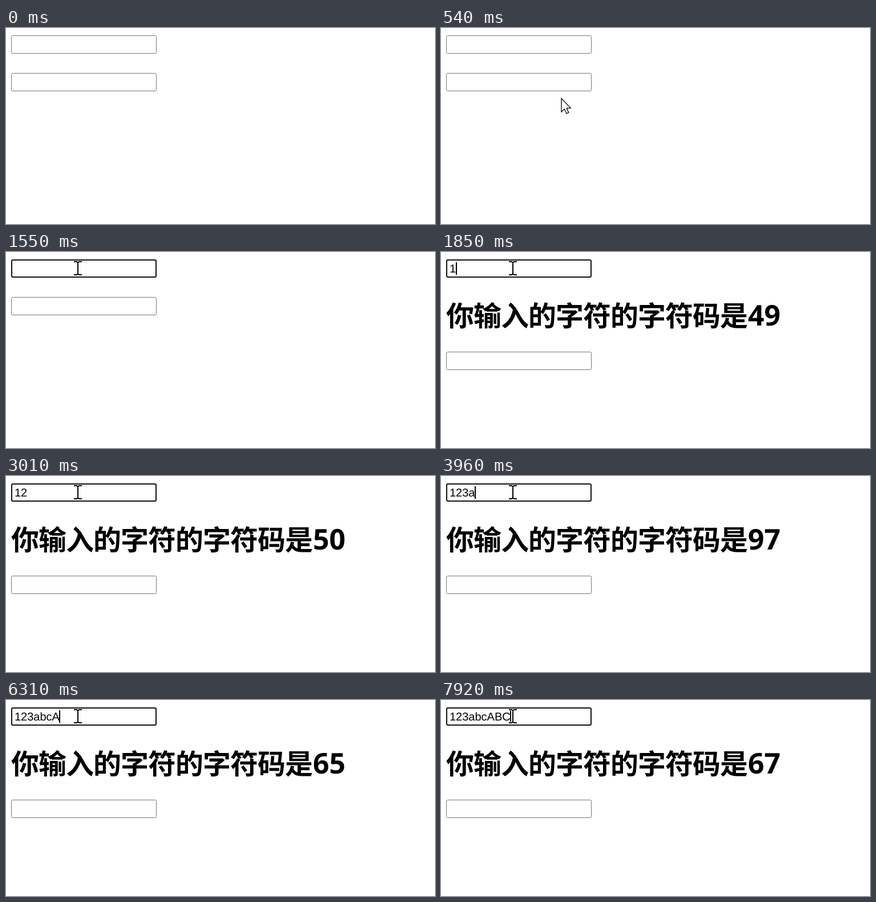
Recreate the animation shown at these times as an HTML page. Size 752x344 px, loop 8000 ms.

```html
<!DOCTYPE html>
<html lang="zh-CN">
<head>
<meta charset="utf-8">
<title>Key codes</title>
<style>
html, body { margin: 0; width: 100%; height: 100%; overflow: hidden; background: #fff; }
svg { display: block; }
text { white-space: pre; text-rendering: geometricPrecision; }
.field { fill: #fff; stroke: #767676; }
.field.hover { stroke: #4a4a4a; }
.field.focus { stroke: #101010; stroke-width: 2; }
#typed { font: 20px "Liberation Sans", Arial, sans-serif; }
#label { font: 700 49px "Noto Sans CJK SC", "Noto Sans CJK", "Noto Sans CJK JP", sans-serif; letter-spacing: -1px; }
#code { font: 700 50px "Open Sans", "Noto Sans", sans-serif; }
#beam path { fill: none; stroke: #000; stroke-width: 2; }
#beam path:first-child { stroke: #fff; stroke-width: 4; }
#arrow { fill: #fff; stroke: #000; stroke-width: 1.3; }
</style>
</head>
<body>
<svg width="752" height="344" viewBox="0 0 752 344">
  <defs>
    <path id="bar" d="M-7 -11.5H-2L0 -10L2 -11.5H7M0 -10.5V10.5M-7 11.5H-2L0 10L2 11.5H7"/>
  </defs>
  <rect id="first" class="field"/>
  <rect id="second" class="field" x="9.5" y="79.5" width="254" height="31" rx="2"/>
  <text id="typed" x="15" y="36"></text>
  <rect id="caret" y="18" width="2" height="22"/>
  <g id="result">
    <text id="label" x="9" y="129.5">你输入的字符的字符码是</text>
    <text id="code" x="538" y="128.5"></text>
  </g>
  <g id="pointer">
    <g id="beam">
      <path d="M-7 -11.5H-2L0 -10L2 -11.5H7M0 -10.5V10.5M-7 11.5H-2L0 10L2 11.5H7"/>
      <path d="M-7 -11.5H-2L0 -10L2 -11.5H7M0 -10.5V10.5M-7 11.5H-2L0 10L2 11.5H7"/>
    </g>
    <path id="arrow" d="M.7 1V24.5L6 19.4L9.6 27.5L13.4 25.8L9.9 17.9H17Z"/>
  </g>
</svg>
<script>
const LOOP = 8000, FOCUS = 1040, TICK = 50;

// time, typed text, caret shown
const steps = [
  [0, '', 0], [FOCUS, '', 1], [1550, '', 0],
  [1850, '1', 1], [2410, '1', 0],
  [2510, '12', 1], [3010, '12', 0],
  [3060, '123', 1], [3550, '123', 0],
  [3960, '123a', 1], [4510, '123a', 0],
  [4670, '123ab', 1],
  [5170, '123abc', 1], [5710, '123abc', 0], [6210, '123abc', 1],
  [6310, '123abcA', 1], [6820, '123abcA', 0], [7310, '123abcA', 1],
  [7360, '123abcAB', 1], [7870, '123abcAB', 0],
  [7920, '123abcABC', 1]
];

// time, x, y of the pointer
const path = [
  [340, 295, 201], [490, 228, 139], [640, 175, 90], [690, 150, 65],
  [790, 131, 36], [890, 123, 18], [1040, 126, 27], [1140, 126, 28.5]
];

const $ = id => document.getElementById(id);
const show = (id, on) => $(id).setAttribute('visibility', on ? 'visible' : 'hidden');
const set = (id, attrs) => {
  for (const k in attrs) $(id).setAttribute(k, attrs[k]);
};

function pointerAt(t) {
  const start = path[0][0];
  t = start + Math.floor((t - start) / TICK) * TICK;
  const i = path.findIndex(p => p[0] > t);
  if (i < 0) return path[path.length - 1].slice(1);
  const [a, b] = [path[i - 1], path[i]];
  const k = (t - a[0]) / (b[0] - a[0]);
  return [a[1] + (b[1] - a[1]) * k, a[2] + (b[2] - a[2]) * k];
}

function drawPointer(t) {
  const on = t >= path[0][0];
  const [x, y] = on ? pointerAt(t) : [0, 0];
  const over = top => on && x >= 9 && x <= 264 && y >= top && y <= top + 32;
  const inFirst = over(13), inSecond = t < 1850 && over(79);
  set('pointer', { transform: `translate(${x} ${y})` });
  show('beam', on && (inFirst || inSecond));
  show('arrow', on && !inFirst && !inSecond);

  const focus = t >= FOCUS;
  const inset = focus ? 1 : 0.5;
  set('first', {
    class: 'field' + (focus ? ' focus' : inFirst ? ' hover' : ''),
    x: 9 + inset, y: 13 + inset, width: 255 - 2 * inset, height: 32 - 2 * inset, rx: 2
  });
  set('second', { class: 'field' + (inSecond ? ' hover' : '') });
}

function drawText(t) {
  const [, text, caret] = steps.filter(s => s[0] <= t).pop();
  const typed = $('typed');
  if (typed.textContent !== text) typed.textContent = text;
  $('code').textContent = text ? text.charCodeAt(text.length - 1) : '';
  show('result', text);
  set('second', { y: text ? 175.5 : 79.5 });
  set('caret', { x: 15 + Math.floor(text ? typed.getComputedTextLength() : 0) });
  show('caret', caret);
}

function frame() {
  const t = performance.now() % LOOP;
  drawText(t);
  drawPointer(t);
  requestAnimationFrame(frame);
}
frame();
</script>
</body>
</html>
```
